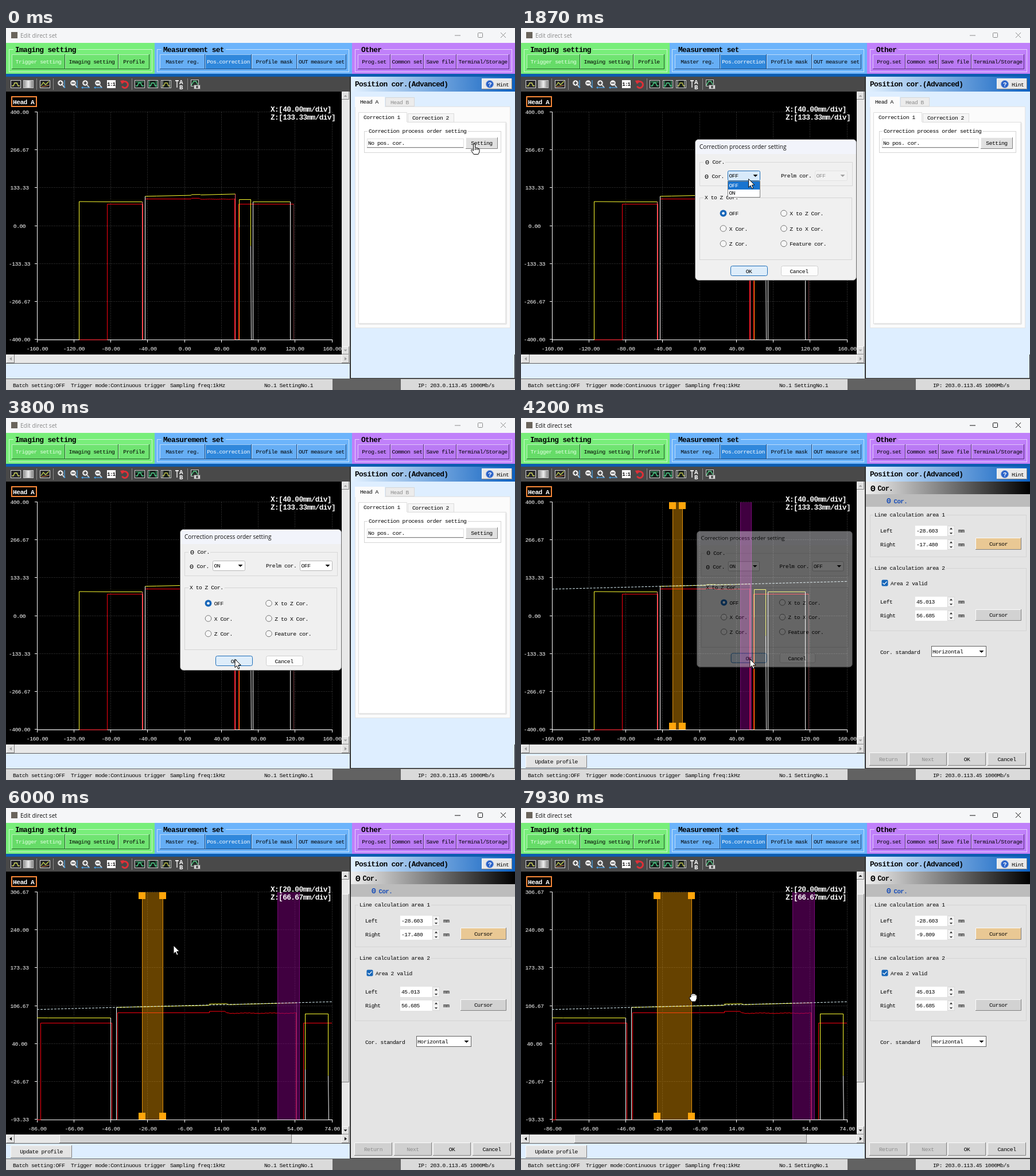
Recreate the animation shown at these times as an HTML page with a canvas. Size 887 by 632 pixels, loop 8 s.

```html
<!DOCTYPE html>
<html lang="en">
<head>
<meta charset="utf-8">
<title>Edit direct set</title>
<style>
html, body { margin: 0; width: 100%; height: 100%; overflow: hidden; }
canvas { display: block; }
</style>
</head>
<body>
<canvas id="stage" width="887" height="632"></canvas>
<script>
const stage = document.getElementById('stage').getContext('2d');
const layer = new OffscreenCanvas(887, 632).getContext('2d');
let g = stage;
const LOOP = 8000, STEP = 1000 / 15;
const OPEN = 50, LIST = 1500, PICK = 2600, CLOSE = 4130, ZOOM = 5930, GRAB = 7070;
const YELLOW = '#ffff30', RED = '#ff0010', WHITE = '#fff', ORANGE = '#ffa50a';

// Pointer path: time, x, y of the hot spot
const PATH = [
  [0, 816, 202], [130, 812, 204], [800, 392, 283], [930, 392, 282], [1400, 398, 260],
  [1700, 398, 260], [2300, 391, 279], [2800, 391, 279], [3600, 399, 421], [4500, 399, 421],
  [5330, 303, 274], [5600, 303, 274], [5900, 292, 240], [6130, 292, 240], [6600, 366, 346],
  [6730, 366, 346], [GRAB, 276, 331], [7270, 276, 331], [7900, 300, 331], [LOOP, 300, 331]
];

const clamp = v => Math.max(0, Math.min(1, v));
const ease = u => u * u * (3 - 2 * u);
const snap = v => Math.floor(v) + .5;

function pointerAt(t) {
  let i = 1;
  while (i < PATH.length - 1 && PATH[i][0] < t) i++;
  const [t0, x0, y0] = PATH[i - 1], [t1, x1, y1] = PATH[i];
  const u = ease(clamp((t - t0) / (t1 - t0)));
  return [x0 + (x1 - x0) * u, y0 + (y1 - y0) * u];
}

// ---- drawing helpers ----
function box(x, y, w, h, fill, edge) {
  if (fill) { g.fillStyle = fill; g.fillRect(x, y, w, h); }
  if (edge) { g.strokeStyle = edge; g.lineWidth = 1; g.strokeRect(x + .5, y + .5, w - 1, h - 1); }
}

function round(x, y, w, h, r, fill, edge) {
  g.beginPath();
  g.roundRect(x + .5, y + .5, w - 1, h - 1, r);
  if (fill) { g.fillStyle = fill; g.fill(); }
  if (edge) { g.strokeStyle = edge; g.lineWidth = 1; g.stroke(); }
}

function line(color, pts, width = 1) {
  g.strokeStyle = color;
  g.lineWidth = width;
  g.beginPath();
  pts.forEach(([x, y]) => g.lineTo(x, y));
  g.stroke();
}

function poly(fill, pts, edge) {
  g.beginPath();
  pts.forEach(([x, y]) => g.lineTo(x, y));
  g.closePath();
  g.fillStyle = fill;
  g.fill();
  if (edge) { g.strokeStyle = edge; g.lineWidth = 1; g.stroke(); }
}

function disc(x, y, r, fill, edge, width = 1) {
  g.beginPath();
  g.arc(x, y, r, 0, 7);
  if (fill) { g.fillStyle = fill; g.fill(); }
  if (edge) { g.strokeStyle = edge; g.lineWidth = width; g.stroke(); }
}

function text(s, x, y, color = '#000', adv = 5.33, bold = false, align = 'left') {
  const size = adv / .6 * 1.09;
  g.font = `${bold ? 'bold ' : ''}${size}px "Liberation Mono", monospace`;
  g.letterSpacing = `${adv - size * .6}px`;
  g.textAlign = align;
  g.fillStyle = color;
  g.fillText(s, x, y + size * .33);
}

const mid = (s, x, y, color, adv) => text(s, x, y, color, adv, false, 'center');

function caption(s, x, y, color) {
  g.font = '10.1px "Open Sans", sans-serif';
  g.letterSpacing = '0px';
  g.textAlign = 'left';
  g.fillStyle = color;
  g.fillText(s, x, y + 3.6);
}

function grad(x0, x1, ...stops) {
  const f = g.createLinearGradient(x0, 0, x1, 0);
  stops.forEach((c, i) => f.addColorStop(i / (stops.length - 1), c));
  return f;
}

function button(x, y, w, h, label, fill = '#e1e1e1', color = '#000') {
  box(x, y, w, h, fill);
  line('#fafafa', [[x + .5, y + h], [x + .5, y + .5], [x + w, y + .5]]);
  line('#808080', [[x + w - .5, y], [x + w - .5, y + h - .5], [x, y + h - .5]]);
  if (label) mid(label, x + w / 2, y + h / 2, color);
}

function group(x, y, w, h, label, bg, lx = x + 8) {
  box(x, y, w, h, null, '#d4d4d4');
  box(lx - 2, y - 1, label.length * 5.33 + 4, 3, bg);
  text(label, lx, y);
}

const triangle = (x, y, s, c) => poly(c, [[x - s, y - s / 2], [x + s, y - s / 2], [x, y + s / 2]]);

function theta(x, y, adv = 5.33, color = '#000', bold = false) {
  text('Θ', x, y, color, adv * 1.2, bold);
  text('Cor.', x + 12.5, y, color, adv, bold);
}

// ---- window frame ----
function titleBar(active) {
  const c = active ? '#111' : '#8a8a8a';
  box(0, 0, 887, 26, '#f5f6f8');
  box(9, 7, 11, 11, '#6a645c');
  caption('Edit direct set', 25, 13, c);
  line(c, [[782, 13], [792, 13]]);
  round(822, 8, 9, 9, 1, null, c);
  line(c, [[862, 8], [871, 17]]);
  line(c, [[871, 8], [862, 17]]);
}

function menu(x, w, bg, face, dark, name, items) {
  box(x, 26, w, 54, bg);
  const left = items[0][1] - 5, last = items[items.length - 1];
  box(left, 37, last[1] + last[2] - left + 5, 40, null, 'rgba(255,255,255,.65)');
  box(left + 8, 36, name.length * 7.07 + 6, 3, bg);
  text(name, left + 11, 38, '#000', 7.07, true);
  for (const [label, bx, bw, fill, color] of items) {
    box(bx, 46, bw, 26, fill || face);
    line('rgba(255,255,255,.55)', [[bx + .5, 72], [bx + .5, 46.5], [bx + bw, 46.5]]);
    line(dark, [[bx + bw - .5, 46], [bx + bw - .5, 71.5], [bx, 71.5]]);
    mid(label, bx + bw / 2, 59, color);
  }
}

function menus() {
  menu(0, 259, '#78ee7a', '#70e472', '#1c5c20', 'Imaging setting', [
    ['Trigger setting', 10, 93, '#66dc68', '#e6ffe6'], ['Imaging setting', 103, 93], ['Profile', 196, 54]]);
  menu(259, 344, '#6cb4fb', '#66aef5', '#1c4a80', 'Measurement set', [
    ['Master reg.', 268, 79], ['Pos.correction', 347, 81, '#3088dc', '#fff'],
    ['Profile mask', 428, 79], ['OUT measure set', 507, 86]]);
  menu(603, 284, '#c080fa', '#ba7af4', '#54287c', 'Other', [
    ['Prog.set', 613, 57], ['Common set', 670, 58], ['Save file', 728, 57], ['Terminal/Storage', 785, 92]]);
  box(0, 80, 887, 5, '#0c5cb0');
}

function wave(x, c) {
  line(c, [[x, 101], [x + 3, 101], [x + 5, 96], [x + 9, 96], [x + 11, 101], [x + 14, 101]], 1.3);
}

function lens(x, plus, upright) {
  line('#d8d8d8', [[x + 2, 99], [x + 6, 104]], 2);
  disc(x - 1, 96, 4.6, '#f8f8f8', '#b8b8b8');
  line('#222', [[x - 4, 96], [x + 2, 96]], 1.4);
  if (plus) line('#222', [[x - 1, 93], [x - 1, 99]], 1.4);
  if (upright) {
    line('#49a8f0', [[x + 6, 91], [x + 6, 104]], 1.2);
    triangle(x + 6, 104, 2, '#49a8f0');
  } else {
    line('#49a8f0', [[x - 6, 104], [x + 7, 104]], 1.2);
    poly('#49a8f0', [[x - 8, 104], [x - 5, 102], [x - 5, 106]]);
  }
}

function toolbar() {
  box(0, 85, 600, 26, '#494949');
  for (const x of [53, 82, 219, 316]) box(x, 88, 1, 20, '#8a8a8a');
  box(8, 91, 18, 14, '#26262a', '#d8d8d8');
  wave(10, '#d8e060');
  box(30, 91, 18, 14, grad(30, 48, '#888', '#eee', '#777'), '#c8c8c8');
  box(59, 91, 18, 14, '#26262a', '#d8d8d8');
  line('#c8d850', [[61, 101], [65, 95], [69, 99], [75, 93]], 1.3);
  line('#d08040', [[61, 103], [75, 100]]);
  lens(96, true, true);
  lens(118, false, true);
  lens(139, true, false);
  lens(161, false, false);
  box(176, 91, 15, 14, '#fff');
  text('1:1', 183.5, 98, '#000', 4.6, true, 'center');
  g.beginPath();
  g.arc(207, 99, 5.5, -2.6, 2.6);
  g.strokeStyle = '#e03038';
  g.lineWidth = 3;
  g.stroke();
  poly('#e03038', [[199, 92], [206, 91], [202, 98]]);
  for (const x of [224, 247, 270]) {
    box(x, 91, 18, 14, '#18201c', '#d0d0d0');
    wave(x + 2, x === 270 ? '#c8c850' : '#50d890');
  }
  line('#50d890', [[226, 94], [240, 94]]);
  for (const x of [250, 262, 273, 285]) line(x < 270 ? '#50d890' : '#e0e0e0', [[x, 92], [x, 104]]);
  line('#eee', [[295, 92], [301, 92]], 2);
  line('#eee', [[298, 92], [298, 104]], 1.5);
  text('A', 302, 94, '#fff', 6, true);
  text('B', 302, 103, '#fff', 6, true);
  box(322, 90, 14, 12, '#26302c', '#d0d0d0');
  line('#60d890', [[323, 100], [327, 93], [331, 93], [335, 100]], 1.3);
  box(327, 99, 12, 8, '#d8d8d8', '#666');
  disc(333, 103, 2.2, '#555');
}

// ---- graph ----
function graph(zoomed, page, right) {
  const [x0, xs, z1, zs] = zoomed ? [-86, 160, 920 / 3, 400] : [-160, 320, 400, 800];
  const X = v => 54 + (v - x0) / xs * 514;
  const Z = v => 146.8 + (z1 - v) / zs * 397.5;
  const trace = (c, ...pts) => line(c, pts.map(([x, z]) => [snap(X(x)), Z(Math.max(z, z1 - zs))]));
  const flat = z => z1 - (snap(Z(z)) - 146.8) / 397.5 * zs;

  box(0, 111, 585, 460, '#000');
  g.setLineDash([1, 2]);
  for (let i = 1; i <= 8; i++) line('#4a4a4a', [[snap(54 + i * 64.25), 147], [snap(54 + i * 64.25), 544]]);
  for (let i = 0; i < 6; i++) line('#4a4a4a', [[54, snap(146.4 + i * 66.25)], [568, snap(146.4 + i * 66.25)]]);
  g.setLineDash([]);

  line(WHITE, [[54.5, 146], [54.5, 544.5], [568, 544.5]]);
  for (let i = 0; i <= 6; i++) {
    const y = snap(146.4 + i * 66.25);
    line(WHITE, [[50, y], [54, y]]);
    mid((z1 - zs * i / 6).toFixed(2).replace(/^-0.00/, '0.00'), 23.5, y, '#fff');
  }
  for (let i = 0; i <= 8; i++) {
    const x = snap(54 + i * 64.25);
    line(WHITE, [[x, 544], [x, 549]]);
    mid((x0 + xs * i / 8).toFixed(2), x, 560, '#fff');
  }

  g.save();
  g.beginPath();
  g.rect(54, 146, 514, 400);
  g.clip();
  const low = -400, side = flat(76.3), top = flat(95), ripple = [];
  for (let v = 18; v < 55; v += .8) ripple.push([v, top - .7 + .8 * Math.sin(v * 2.3) * Math.sin(v * 5.1)]);
  trace(RED, [-114.5, low], [-84, low], [-84, side], [-45.4, side], [-45.4, low]);
  trace(RED, [-42.4, low], [-42.4, top], [7.4, top], [7.6, top + 2.5], [16, top + 2.5], [17, top], ...ripple, [54.4, top], [54.4, low]);
  trace(RED, [58.7, low], [58.7, side], [118.3, side]);
  trace('#70383c', [118.3, side], [118.3, low]);

  const left = flat(85.5), step = flat(93);
  trace(WHITE, [-160, low], [-114.5, low]);
  trace(YELLOW, [-114.5, low], [-114.5, left + 1], [-80, left], [-46, left]);
  trace(zoomed ? WHITE : '#ff8888', [-46, left], [-46, low]);
  trace(WHITE, [-46, low], [-42.9, low], [-42.9, 104]);
  trace(YELLOW, [-42.9, 104], [-30, 105], [7.3, 107.6], [7.6, 110], [17, 110.4], [18, 109], [54.9, 112]);
  trace(zoomed ? '#886070' : '#ff6070', [54.9, 112], [54.9, low]);
  trace(WHITE, [54.9, low], [59.4, low]);
  trace(zoomed ? WHITE : '#ff9a10', [59.4, low], [59.4, zoomed ? step : -5]);
  const knee = zoomed ? -16 : -70;
  trace(YELLOW, [59.4, -5], [59.4, step], [71.9, step], [71.9, knee]);
  trace(WHITE, [72.1, knee], [72.3, low], [74.7, low], [74.7, flat(84)]);
  trace(YELLOW, [74.7, flat(84)], [114.6, flat(84)]);
  trace(WHITE, [114.6, flat(84)], [114.6, low], [160, low]);
  g.restore();

  if (page) {
    const [l, r, pl, pr] = [-28.603, right, 45.013, 56.685].map(v => snap(X(v) - 1));
    box(pl, 147, pr - pl, 397, 'rgba(128,0,128,.5)');
    line('#780a78', [[pl, 147], [pl, 544]]);
    line('#780a78', [[pr, 147], [pr, 544]]);
    box(l, 147, r - l, 397, 'rgba(255,165,0,.4)');
    line('#e0900e', [[l, 147], [l, 544]]);
    line('#e0900e', [[r, 147], [r, 544]]);
    for (const x of [l, r]) for (const y of [147, 532]) box(x - 6.5, y, 12, 12, ORANGE);
    g.setLineDash([4, 2]);
    line('#d8eef4', [[54, Z(94.1 + 27.2 * (x0 + 160) / 320)], [568, Z(94.1 + 27.2 * (x0 + xs + 160) / 320)]]);
    g.setLineDash([]);
  }
  text(`X:[${zoomed ? '20.00' : '40.00'}mm/div]`, 461, 142, '#fff', 7.07, true);
  text(`Z:[${zoomed ? '66.67' : '133.33'}mm/div]`, 461, 156, '#fff', 7.07, true);
  g.strokeStyle = '#f88838';
  g.lineWidth = 2;
  g.strokeRect(10, 120, 43, 17);
  text('Head A', 12, 129, '#fff', 6.2, true);
}

function scrollbars(zoomed) {
  const c = zoomed ? '#000' : '#9a9a9a';
  box(585, 111, 14, 475, '#e8e8e8');
  box(0, 570, 599, 15, '#e8e8e8');
  button(585, 111, 13, 14);
  button(585, 556, 13, 14);
  button(1, 570, 14, 15);
  button(585, 570, 13, 15);
  poly(c, [[588.5, 120], [594.5, 120], [591.5, 117]]);
  triangle(591.5, 563, 3, c);
  poly(c, [[10, 574.5], [10, 580.5], [6, 577.5]]);
  poly(c, [[590, 574.5], [590, 580.5], [594, 577.5]]);
  if (zoomed) {
    button(585, 150, 13, 329, '', '#d2d2d2');
    button(93, 570, 405, 15, '', '#d2d2d2');
  }
  box(0, 585, 599, 1, '#606060');
}

function statusBar() {
  box(0, 612, 887, 20, '#626262');
  box(0, 613, 569, 19, '#dadada');
  box(688, 613, 199, 19, '#dadada');
  text('Batch setting:OFF', 12, 624);
  text('Trigger mode:Continuous trigger', 113, 624);
  text('Sampling freq:1kHz', 286, 624);
  text('No.1 SettingNo.1', 450, 624);
  text('IP: 203.0.113.45 1000Mb/s', 718, 624);
}

// ---- right side ----
function sideHeader() {
  box(600, 85, 287, 26, grad(600, 887, '#e4f2ff', '#0c60c0'));
  text('Position cor.(Advanced)', 608, 98, '#000', 7.07, true);
  button(829, 88, 53, 19, '', '#e8e8e8');
  disc(843, 98, 6.5, '#2a62c8', '#88a8e0');
  text('?', 843, 98, '#fff', 6, true, 'center');
  text('Hint', 855, 99);
}

function overview() {
  box(600, 111, 287, 501, '#deeeff');
  box(608, 137, 271, 387, '#fbfbfb', '#e4e4e4');
  box(608, 120, 52, 18, '#fbfbfb');
  text('Head A', 617, 129);
  box(661, 121, 51, 16, '#ececec', '#d8d8d8');
  text('Head B', 670, 130, '#8c8c8c');
  box(614, 164, 258, 353, '#fff', '#dcdcdc');
  box(616, 515, 256, 3, '#e6e6e6');
  box(870, 166, 3, 351, '#e6e6e6');
  box(700, 149, 81, 16, '#f5f5f5', '#dcdcdc');
  text('Correction 2', 708, 157);
  box(614, 147, 85, 18, '#fff');
  line('#dcdcdc', [[614.5, 165], [614.5, 147.5], [698.5, 147.5], [698.5, 164]]);
  text('Correction 1', 623, 156);
  group(624, 180, 239, 38, 'Correction process order setting', '#fff', 632);
  box(629, 193, 169, 17, '#fff', '#e0e0e0');
  box(629, 208, 168, 1, '#808080');
  text('No pos. cor.', 631, 201);
  button(801, 191, 56, 20, 'Setting');
  box(886, 570, 1, 42, '#303030');
}

function spin(label, value, y) {
  text(label, 626, y);
  box(687, y - 9, 57, 18, '#fff');
  text(value, 689, y);
  box(743, y - 9, 13, 18, '#f2f2f2', '#d8d8d8');
  poly('#222', [[747, y - 2.5], [752, y - 2.5], [749.5, y - 5.5]]);
  triangle(749.5, y + 4.5, 2.6, '#222');
  text('mm', 762, y);
}

function settings(right) {
  const bg = '#e4e4e4';
  box(600, 111, 287, 501, bg);
  box(600, 111, 287, 22, grad(600, 887, '#f0f0f0', '#000'));
  theta(609, 123, 6.6, '#000', true);
  box(600, 133, 287, 22, '#bcbcbc');
  theta(637, 145, 5.9, '#1c50b8', true);
  group(608, 169, 273, 74, 'Line calculation area 1', bg);
  spin('Left', '-28.603', 197);
  spin('Right', right.toFixed(3), 221);
  button(792, 209, 80, 21, 'Cursor', '#e9c894');
  group(608, 262, 273, 110, 'Line calculation area 2', bg);
  round(628, 282, 12, 12, 2, '#1766b8');
  line('#fff', [[630.5, 288], [633, 290.5], [637.5, 285.5]], 1.2);
  text('Area 2 valid', 644, 289);
  spin('Left', '45.013', 321);
  spin('Right', '56.685', 345);
  button(792, 334, 80, 20, 'Cursor', '#d2d2d2');
  text('Cor. standard', 626, 409);
  box(715, 398, 96, 19, '#fff', '#606060');
  text('Horizontal', 717, 408);
  triangle(802.5, 408, 4, '#000');
  button(607, 584, 66, 23, 'Return', '#d0d0d0', '#8c8c8c');
  button(676, 584, 66, 23, 'Next', '#d0d0d0', '#8c8c8c');
  button(744, 584, 66, 23, 'OK', '#d6d6d6');
  button(813, 584, 67, 23, 'Cancel', '#d6d6d6');
}

// ---- dialog ----
function combo(x, value, on, hot) {
  round(x, 249, 57, 18, 2, hot ? '#d8eafa' : on ? '#fff' : '#f2f2f2', hot ? '#1c6cb8' : on ? '#b8b8b8' : '#e2e2e2');
  text(value, x + 2.5, 258, on ? '#000' : '#8c8c8c');
  triangle(x + 48.5, 258, 4, on ? '#000' : '#a0a0a0');
}

function dialog(t) {
  const picked = t >= PICK, bg = '#f0f0f0';
  round(303, 194, 282, 247, 6, bg, '#686868');
  g.beginPath();
  g.roundRect(304, 195, 280, 25, [5, 5, 0, 0]);
  g.fillStyle = '#f2f4fb';
  g.fill();
  caption('Correction process order setting', 311, 207, '#111');
  box(311, 234, 267, 42, null, '#d8d8d8');
  box(318, 233, 38, 3, bg);
  theta(321, 234);
  theta(320, 259);
  combo(360, picked ? 'ON' : 'OFF', true, t >= LIST && t < PICK + 400);
  text('Prelm cor.', 453, 258);
  combo(512, 'OFF', picked, false);
  group(311, 296, 266, 109, 'X to Z Cor.', bg, 320);
  [['OFF', 'X to Z Cor.'], ['X Cor.', 'Z to X Cor.'], ['Z Cor.', 'Feature cor.']].forEach((row, r) =>
    row.forEach((label, c) => {
      const x = 352.5 + c * 105.5, y = 323.5 + r * 26.5;
      if (r || c) disc(x, y, 5.3, '#f6f6f6', '#777');
      else { disc(x, y, 5.9, '#1766b8'); disc(x, y, 2.3, '#fff'); }
      text(label, x + 10.3, y + .5);
    }));
  round(365, 415, 65, 18, 3, '#deedfa', '#1c6cb8');
  mid('OK', 397, 424.5);
  round(453, 415, 65, 18, 3, '#fdfdfd', '#cfcfcf');
  mid('Cancel', 484.5, 424.5);
  if (t >= LIST && !picked) {
    const on = pointerAt(t)[1] > 272;
    box(360, 267, 57, 29, '#fff', '#808080');
    box(361, on ? 281 : 268, 55, 14, '#1874d0');
    text('OFF', 362.5, 275, on ? '#000' : '#fff');
    text('ON', 362.5, 288, on ? '#fff' : '#000');
  }
}

// The dialog fades as one sheet while it grows in or shrinks away.
function showDialog(t) {
  const opening = ease(clamp((t - OPEN) / 170)), closing = clamp((t - CLOSE) / 140);
  const alpha = opening * (t < CLOSE ? 1 : .84 * (1 - closing));
  if (!alpha) return;
  const scale = .92 + .08 * opening - .07 * closing;
  layer.clearRect(0, 0, 887, 632);
  g = layer;
  g.save();
  g.translate(385, 283);
  g.scale(scale, scale);
  g.translate(-385, -283);
  dialog(t);
  g.restore();
  g = stage;
  g.globalAlpha = alpha;
  g.drawImage(layer.canvas, 0, 0);
  g.globalAlpha = 1;
}

// ---- pointer ----
function pointer(t) {
  const [x, y] = pointerAt(t);
  g.save();
  g.translate(x, y);
  g.lineJoin = 'round';
  if (t < 130) {
    poly('#fff', [[-1.5, 1], [0, 0], [1.5, 1], [1.5, 7], [4, 7], [6.5, 8], [9, 9.5], [9, 14], [7, 18.5],
      [-1, 18.5], [-5.5, 11.5], [-4.5, 10], [-1.5, 12]], '#000');
    for (const k of [1.5, 4, 6.5]) line('#000', [[k, 8], [k, 11]]);
  } else if (t < GRAB) {
    poly('#fff', [[0, 0], [0, 14.6], [3.3, 11.5], [5.7, 17], [8, 16], [5.7, 10.6], [10.2, 10.4]], '#000');
  } else {
    poly('#fff', [[-4, -5], [-2, -6.5], [0, -7], [2.5, -6.5], [5, -5], [6.5, -3], [6.3, 2], [4, 7],
      [-3, 7], [-6.5, 1], [-6, -1], [-4, -1]], '#000');
    for (const k of [-1.5, 1, 3.5]) line('#555', [[k, -5.5], [k, -3]], .8);
  }
  g.restore();
}

function draw(t) {
  const page = t >= CLOSE, zoomed = t >= ZOOM;
  const drag = t >= GRAB ? clamp((pointerAt(t)[0] - 276) / 24) : 0;
  const right = -17.48 + 7.671 * drag;
  titleBar(page);
  menus();
  toolbar();
  graph(zoomed, page, right);
  scrollbars(zoomed);
  box(0, 586, 600, 26, '#deeeff');
  if (page) button(8, 589, 107, 22, 'Update profile', '#e4e4e4');
  sideHeader();
  if (page) settings(right); else overview();
  box(599, 85, 2, 527, '#303030');
  box(600, 611, 287, 1, '#303030');
  statusBar();
  showDialog(t);
  pointer(t);
}

const start = performance.now();
let shown = -1;
function tick() {
  const t = (performance.now() - start) % LOOP;
  const n = Math.floor(t / STEP + .08);
  if (n !== shown) draw((shown = n) * STEP % LOOP);
  requestAnimationFrame(tick);
}
tick();
</script>
</body>
</html>
```
